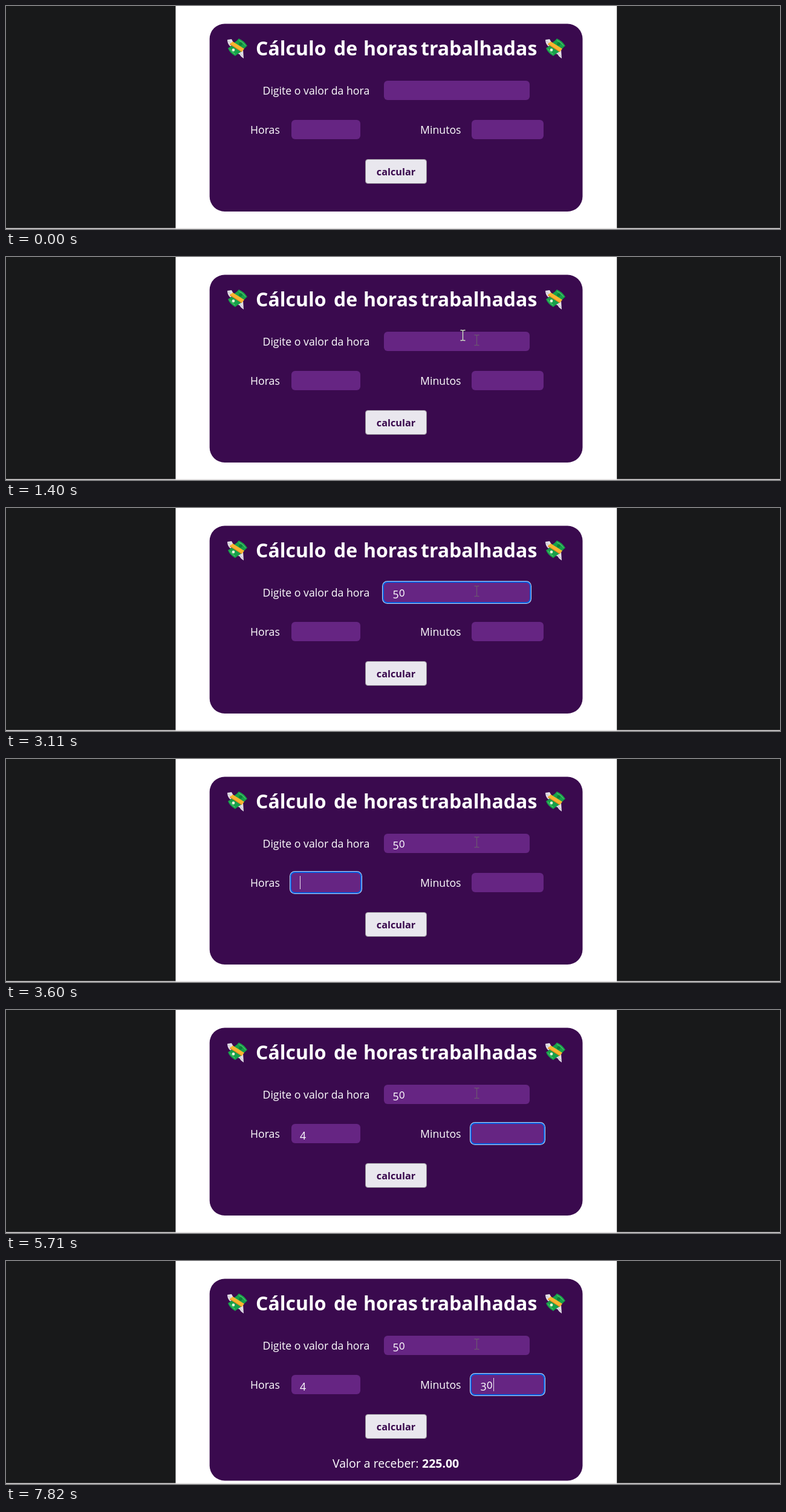
These frames come from a looping animation (1280x370 px, 8000 ms). An HTML page:

```html
<!DOCTYPE html>
<html lang="pt-BR">
<head>
<meta charset="utf-8">
<title>Cálculo de horas trabalhadas</title>
<style>
  html, body { margin: 0; width: 100%; height: 100%; overflow: hidden; background: #18191a; }
  svg { display: block; width: 100%; height: 100%; }
  text { font: 17.7px "Open Sans", "Noto Sans", sans-serif; fill: #fff; }
  .title { font-size: 32px; font-weight: 700; }
  .button { font-size: 16.3px; font-weight: 700; fill: #3a0a4e; text-anchor: middle; }
  .result { font-size: 19.5px; }
  .bold { font-weight: 700; }
  .low { font-family: Inter, sans-serif; font-size: .9em; }
  .drop { baseline-shift: -2.5px; }
  .field { fill: #662583; }
  .beam { fill: none; stroke-width: 1.3; }
</style>
</head>
<body>
<svg viewBox="0 0 1280 370">
  <defs>
    <g id="money">
      <path d="M1 3L8 2 12 9 6 14Q1 10 1 3Z" fill="#e4e1e8"/>
      <path d="M15 25L27 19 28 34Q23 31 21 27Z" fill="#e4e1e8"/>
      <path d="M22 25L27 31M2 5L8 9" stroke="#bdb8c6"/>
      <path d="M20 1Q28 4 34 13Q28 18 24 23Q18 26 14 30Q5 25 2 17Q8 14 12 8Q16 6 20 1Z" fill="#17a04a"/>
      <path d="M20 4Q27 7 31 13M5 18Q9 24 14 27" fill="none" stroke="#4fc46a" stroke-width="1.2"/>
      <circle cx="23" cy="10" r="2.8" fill="#0b7f38"/>
      <circle cx="11" cy="20" r="2.4" fill="#e5f5d9"/>
      <path d="M5 10L10 6 29 18 25 23Z" fill="#f9b52f"/>
      <path d="M5 10L25 23" stroke="#e78525" stroke-width="1.3"/>
    </g>
    <path id="beam" class="beam" d="M-4 -8.5H-1.5Q0 -8.5 0 -7Q0 -8.5 1.5 -8.5H4M0 -7V7M-4 8.5H-1.5Q0 8.5 0 7Q0 8.5 1.5 8.5H4"/>
  </defs>

  <rect x="280.5" width="729.7" height="370" fill="#fff"/>
  <rect y="368.5" width="1280" height="1.5" fill="#e2e0e0"/>
  <rect id="card" x="336.7" y="29.5" width="616.8" rx="25" fill="#3a0a4e"/>

  <use href="#money" x="365" y="53"/>
  <use href="#money" x="891" y="53"/>
  <text class="title" y="82"><tspan x="413">Cálculo</tspan> <tspan x="542">de</tspan> <tspan x="591">horas</tspan> <tspan x="686">trabalhadas</tspan></text>
  <text x="424.5" y="146.5">Digite o valor da hora</text>
  <text x="404" y="212">Horas</text>
  <text x="685" y="212">Minutos</text>

  <g id="ring">
    <rect id="ringOuter" rx="8.5" fill="#b9deff"/>
    <rect id="ringInner" rx="7.5" fill="#0d5fe0"/>
  </g>
  <rect class="field" x="625" y="124" width="241" height="32" rx="6"/>
  <rect class="field" x="472" y="189" width="114" height="32" rx="6"/>
  <rect class="field" x="770" y="189" width="119" height="32" rx="6"/>
  <text id="rate" x="639.5" y="147"/>
  <text id="hours" x="486" y="212"/>
  <text id="minutes" x="784.5" y="212"/>
  <rect id="caret" width="1" height="22" fill="#e8e0ec"/>

  <rect x="594.5" y="254.5" width="101" height="40" rx="4" fill="#e9e7ee" stroke="#8d8791"/>
  <text class="button" x="645" y="280.5">calcular</text>
  <g id="result">
    <text class="result" x="540" y="343">Valor a receber:</text>
    <text class="result bold" x="688" y="343">225.00</text>
  </g>

  <use id="ghost" href="#beam" x="778.5" y="138" stroke="#6b5472"/>
  <circle id="click" cx="753.5" cy="127.5" r="12" fill="#ff0" opacity=".45"/>
  <g id="pointer">
    <use id="textPointer" href="#beam" stroke="#d3e8c6"/>
    <path id="arrow" d="M0 0V16L4 12.5 6.5 18 9 17 6.5 11.5H11.5Z" fill="#fff" stroke="#111" stroke-width=".8"/>
  </g>
</svg>
<script>
const LOOP = 8000;
const el = Object.fromEntries([...document.querySelectorAll("[id]")].map(e => [e.id, e]));

const boxes = {
  rate: [625, 124, 241],
  hours: [472, 189, 114],
  minutes: [770, 189, 119]
};

// [time, focused field, its value, caret x or null when blinked off]
const typing = [
  [0, null, "", null],
  [1500, "rate", "", 639],
  [2000, "rate", "", null],
  [2620, "rate", "5", 649],
  [2910, "rate", "50", 660],
  [3110, "rate", "50", null],
  [3600, "hours", "", 486],
  [4200, "hours", "", null],
  [4610, "hours", "4", 496],
  [4810, "hours", "4", null],
  [5210, "minutes", "", 784],
  [5710, "minutes", "", null],
  [6210, "minutes", "", 784],
  [6820, "minutes", "", null],
  [6920, "minutes", "3", 795],
  [7020, "minutes", "30", 806],
  [7320, "minutes", "30", null],
  [7820, "minutes", "30", 806]
];

// Pointer positions, one every 100 ms from 600 ms
const path = [
  [1108, 297], [985, 232], [889, 179], [838, 154], [821, 152.5],
  [778.5, 138], [765, 133], [758, 131], [755.5, 130]
];

// Old-style figures: short 0, descending 3-5
const oldStyle = s => s
  .replace(/0/g, '<tspan class="low">$&</tspan>')
  .replace(/[3-5]/g, '<tspan class="drop">$&</tspan>');

const set = (node, attrs) => {
  for (const name in attrs) node.setAttribute(name, attrs[name]);
};
const show = (node, visible) => { node.style.display = visible ? "" : "none"; };
const write = (node, value) => {
  if (node.dataset.value === value) return;
  node.dataset.value = value;
  node.innerHTML = oldStyle(value);
};

function drawFields(t) {
  const past = typing.filter(step => step[0] <= t);
  const [, focus, , caretX] = past.at(-1);
  for (const name in boxes) {
    const last = past.findLast(step => step[1] === name);
    write(el[name], last ? last[2] : "");
  }
  show(el.ring, focus);
  show(el.caret, caretX !== null);
  if (!focus) return;
  const [x, y, w] = boxes[focus];
  set(el.ringOuter, { x: x - 3, y: y - 3, width: w + 6, height: 38 });
  set(el.ringInner, { x: x - 2, y: y - 2, width: w + 4, height: 36 });
  if (caretX !== null) set(el.caret, { x: caretX, y: y + 5 });
}

function drawPointer(t) {
  const visible = t >= 600 && t < 2620;
  show(el.pointer, visible);
  show(el.ghost, t >= 1100);
  show(el.click, t >= 1500 && t < 1700);
  if (!visible) return;
  const step = Math.min(path.length - 1, Math.floor((t - 600) / 100));
  set(el.pointer, { transform: `translate(${path[step]})` });
  show(el.arrow, step < 3);
  show(el.textPointer, step >= 3);
}

function draw(now) {
  const t = now % LOOP;
  const done = t >= 7620;
  drawFields(t);
  drawPointer(t);
  set(el.card, { height: done ? 335 : 311.5 });
  show(el.result, done);
}

draw(0);
const start = performance.now();
requestAnimationFrame(function tick() {
  draw(performance.now() - start);
  requestAnimationFrame(tick);
});
</script>
</body>
</html>
```
